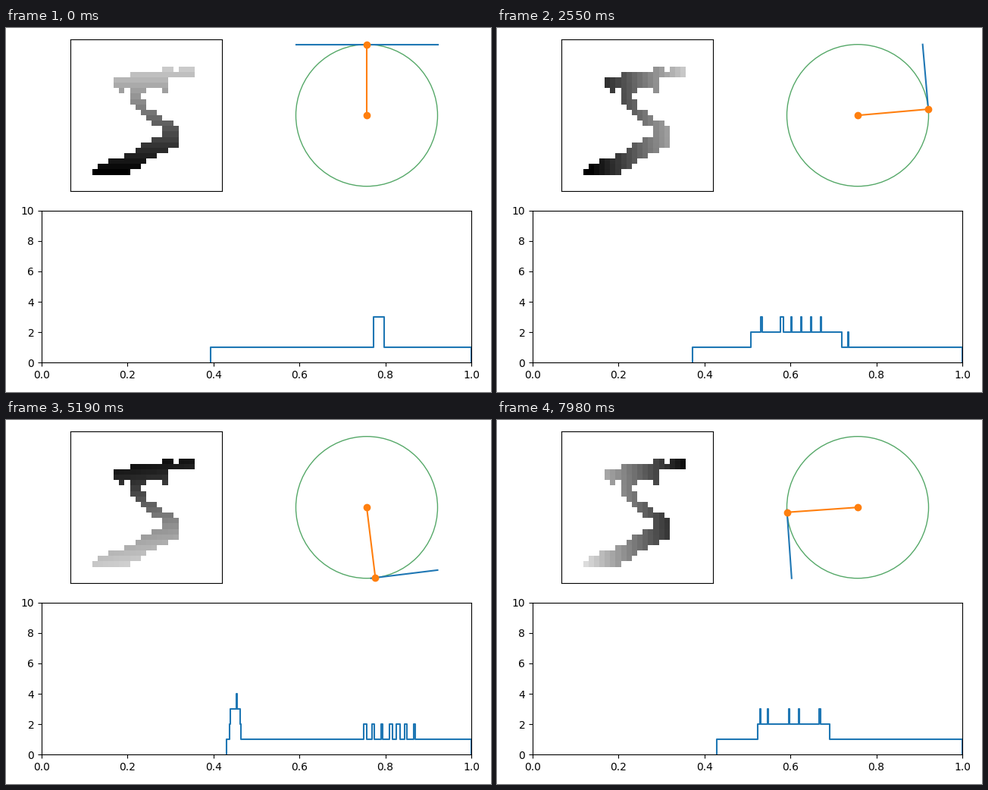
Write a matplotlib script that moves like this. It is 640x480 px and loops after 8 s.

```python
import numpy as np
import matplotlib.pyplot as plt
from matplotlib.animation import FuncAnimation

W, H, DPI = 640, 480, 100
LOOP, INTERVAL, STEP = 8000, 20, 30   # ms; the direction turns 1 degree per STEP
N = 28
SPAN = N * np.sqrt(2)

# Row 5 downwards: column runs (first, last) of the digit's pixels
RUNS = [
    [(17, 18), (20, 22)], [(11, 22)], [(8, 17)], [(8, 17)],
    [(9, 9), (11, 13), (17, 17)], [(11, 12)], [(11, 13)], [(12, 13)],
    [(13, 15)], [(14, 16)], [(15, 18)], [(17, 19)], [(17, 19)],
    [(15, 19)], [(13, 19)], [(12, 17)], [(10, 15)], [(7, 13)],
    [(5, 12)], [(4, 10)],
]
CELLS = [(r, c) for r, row in enumerate(RUNS, 5)
         for a, b in row for c in range(a, b + 1)]
ROWS, COLS = np.array(CELLS).T


def direction(deg):
    a = np.radians(deg)
    return np.sin(a), np.cos(a)


def heights(deg):
    """Height of every digit pixel along the direction, scaled so 1 is the top."""
    dx, dy = direction(deg)
    h = (COLS - N / 2) * dx - (ROWS - N / 2) * dy
    return np.round(np.minimum(1 - (N / 2 - h) / SPAN, 1), 9)


def betti_curve(values):
    """Number of 4-connected components of the sublevel sets, as step points."""
    parent = {}

    def root(p):
        while parent[p] != p:
            p = parent[p]
        return p

    xs, ys, count = [values.min()], [0], 0
    for i in np.argsort(values, kind="stable"):
        if values[i] >= 1:
            break
        r, c = cell = CELLS[i]
        parent[cell] = cell
        count += 1
        for near in ((r - 1, c), (r + 1, c), (r, c - 1), (r, c + 1)):
            if near in parent:
                a, b = root(near), root(cell)
                if a != b:
                    parent[a] = b
                    count -= 1
        if len(xs) > 1 and xs[-1] == values[i]:
            ys[-1] = count
        else:
            xs.append(values[i])
            ys.append(count)
    return xs + [1], ys + [0]


def tangent(deg):
    """Tangent at the direction's tip, cut to the square around the circle."""
    p = np.array(direction(deg))
    t = np.array([p[1], -p[0]])
    lo, hi = -9.0, 9.0
    for q, s in zip(p, t):
        if abs(s) > 1e-9:
            a, b = sorted(((-1 - q) / s, (1 - q) / s))
            lo, hi = max(lo, a), min(hi, b)
    return np.array([p + lo * t, p + hi * t]).T


def add_axes(x, y, w, h):
    return fig.add_axes([x / W, 1 - (y + h) / H, w / W, h / H])


fig = plt.figure(figsize=(W / DPI, H / DPI), dpi=DPI)

ax_img = add_axes(85, 15, 200, 200)
ax_img.set(xticks=[], yticks=[])
picture = ax_img.imshow(np.ones((N, N)), cmap="gray",
                        vmin=heights(0).min(), vmax=1)

ax_dir = add_axes(382.5, 21.7, 187, 187)
ax_dir.set(xlim=(-1, 1), ylim=(-1, 1))
ax_dir.axis("off")
ax_dir.add_patch(plt.Circle((0, 0), 1, fill=False, color="#55a868",
                            clip_on=False))
line, = ax_dir.plot([], [], color="tab:blue", clip_on=False)
arm, = ax_dir.plot([], [], "o-", color="tab:orange", clip_on=False)

ax_curve = add_axes(47, 240.8, 567, 200.4)
ax_curve.set(xlim=(0, 1), ylim=(0, 10))
curve, = ax_curve.step([], [], where="post", color="tab:blue")


def update(k):
    deg = (k * INTERVAL + INTERVAL // 2) // STEP
    values = heights(deg)
    img = np.ones((N, N))
    img[ROWS, COLS] = values
    picture.set_data(img)
    dx, dy = direction(deg)
    arm.set_data([0, dx], [0, dy])
    line.set_data(*tangent(deg))
    curve.set_data(*betti_curve(values))
    return picture, line, arm, curve


anim = FuncAnimation(fig, update, frames=LOOP // INTERVAL, interval=INTERVAL,
                     repeat=True, repeat_delay=0, blit=False)
plt.show()
```
